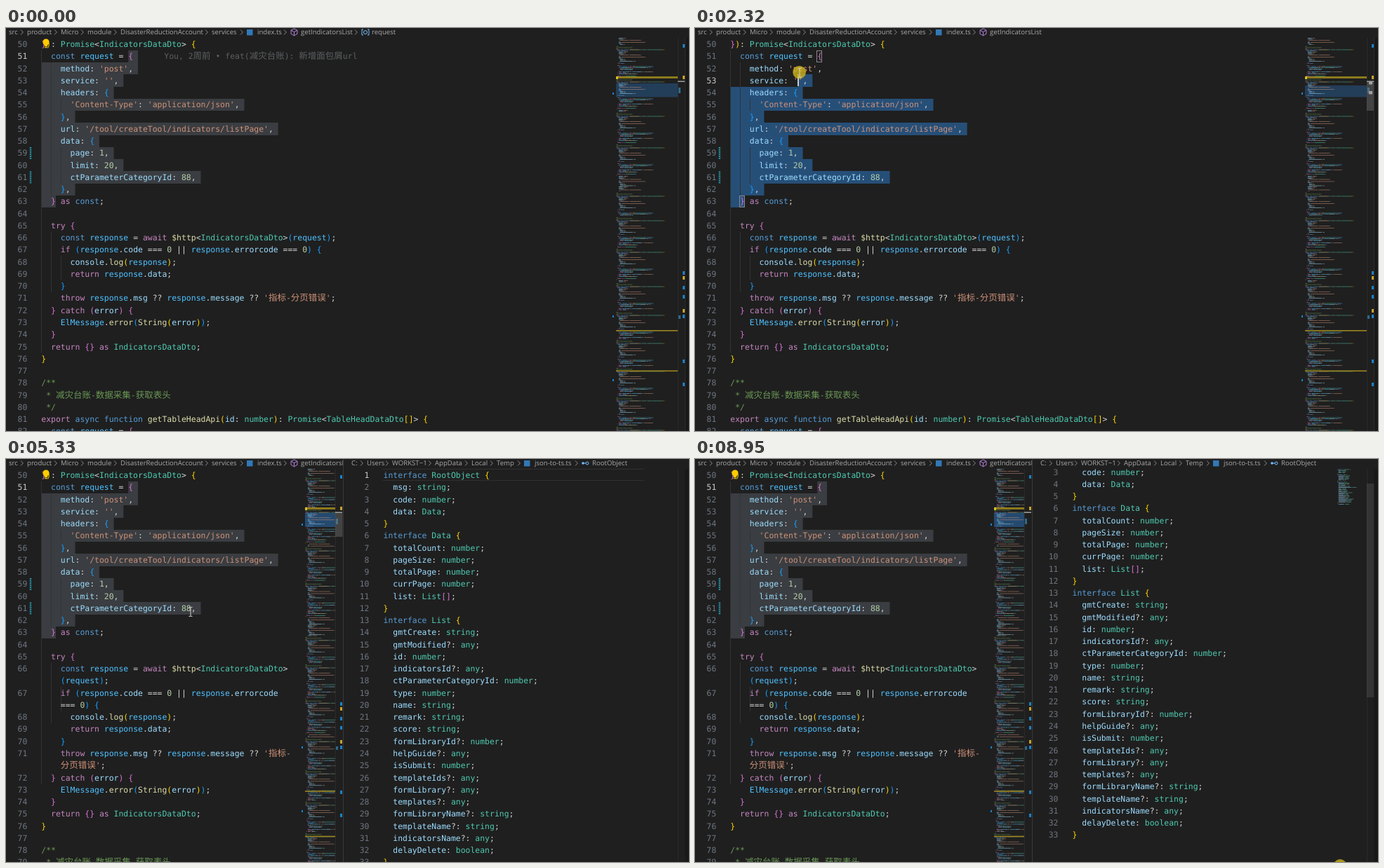
Write an HTML page that moves like this. It is 973 by 575 pixels and loops after 9.09 s.

```html
<!DOCTYPE html>
<html lang="en">
<head>
<meta charset="utf-8">
<title>Code editor</title>
<style>
  html, body { margin: 0; width: 100%; height: 100%; overflow: hidden; background: #1f1f1f; }
  #stage { display: block; width: 973px; height: 575px; }
  text { white-space: pre; text-rendering: geometricPrecision; }
  .code { font: 11.44px "DejaVu Sans Mono", monospace; }
  .cjk { font: 12.5px "Noto Sans CJK SC", "Noto Sans CJK", sans-serif; }
  .crumb { font: 9.6px "Open Sans", "Noto Sans", sans-serif; fill: #a9a9a9; }
</style>
</head>
<body>
<svg id="stage" viewBox="0 0 973 575"></svg>
<script>
const LOOP = 9090, CW = 6.886, CJK_W = 12.5, LH = 17.26, TOP = 14.6, LEFT_X = 50.3, RIGHT_X = 537.5;
const MINI = 1.5;
const stage = document.getElementById('stage');

const SOURCE = `}): Promise<IndicatorsDataDto> {
  const request = {
    method: 'post',
    service: '',
    headers: {
      'Content-Type': 'application/json',
    },
    url: '/tool/createTool/indicators/listPage',
    data: {
      page: 1,
      limit: 20,
      ctParameterCategoryId: 88,
    },
  } as const;

  try {
    const response = await $http<IndicatorsDataDto>¶(request);
    if (response.code === 0 || response.errorcode ¶=== 0) {
      console.log(response);
      return response.data;
    }
    throw response.msg ?? response.message ?? '指标-¶分页错误';
  } catch (error) {
    ElMessage.error(String(error));
  }
  return {} as IndicatorsDataDto;
}

/**
 * 减灾台账-数据采集-获取表头
 */
export async function getTableHeadApi(id: number): Promise<TableHeadDataDto[]> {
  const request = {`.split('\n');

const TYPES = `interface RootObject {
  msg: string;
  code: number;
  data: Data;
}
interface Data {
  totalCount: number;
  pageSize: number;
  totalPage: number;
  currPage: number;
  list: List[];
}
interface List {
  gmtCreate: string;
  gmtModified?: any;
  id: number;
  indicatorsId?: any;
  ctParameterCategoryId: number;
  type: number;
  name: string;
  remark: string;
  score: string;
  formLibraryId?: number;
  helpGuide?: any;
  isSubmit: number;
  templateIds?: any;
  formLibrary?: any;
  templates?: any;
  formLibraryName?: string;
  templateName?: string;
  indicatorsName?: any;
  delayDelete: boolean;
}`.split('\n');

function el(tag, attrs = {}, parent = stage, text) {
  const node = document.createElementNS('http://www.w3.org/2000/svg', tag);
  for (const k in attrs) node.setAttribute(k, attrs[k]);
  if (text !== undefined) node.textContent = text;
  parent.appendChild(node);
  return node;
}
const rect = (p, x, y, width, height, fill, more) => el('rect', { x, y, width, height, fill, ...more }, p);
const pane = (x, y, width, height, p) =>
  el('svg', { x, y, width, height, viewBox: `${x} ${y} ${width} ${height}`, overflow: 'hidden' }, p);
const show = (node, on) => node.setAttribute('visibility', on ? 'inherit' : 'hidden');
const rowTop = i => TOP + i * LH;

// ---- syntax colouring and layout ----
const BRACKETS = ['#ffd700', '#da70d6', '#179fff'];
const WORDS = [
  [/^(await|return|throw|try|catch|if|as|export)$/, '#c586c0'],
  [/^(const|async|function|interface)$/, '#569cd6'],
  [/^(\w+Dto|Promise|RootObject|Data|List|string|number|any|boolean)$/, '#4ec9b0'],
  [/^(request|response|ElMessage)$/, '#4fc1ff'],
  [/^\$http$/, '#dcdcaa']
];

function tokenize(line, state) {
  const out = [];
  const re = /(\/\*\*|^ \*.*$)|('[^']*')|([A-Za-z_$][\w$]*)|(\d+)|([{}()[\]])|(\s+)|(.)/g;
  for (const m of line.matchAll(re)) {
    const s = m[0];
    let c = '#d4d4d4';
    if (m[1]) c = '#6a9955';
    else if (m[2]) c = '#ce9178';
    else if (m[3]) {
      const hit = WORDS.find(w => w[0].test(s));
      c = hit ? hit[1] : line[m.index + s.length] === '(' ? '#dcdcaa' : '#9cdcfe';
    } else if (m[4]) c = '#b5cea8';
    else if (m[5]) {
      const open = '{(['.includes(s);
      if (!open) state.depth--;
      c = BRACKETS[state.depth % 3];
      if (open) state.depth++;
    }
    out.push({ s, c });
  }
  return out;
}

const isCjk = s => /[\u4e00-\u9fff]/.test(s);
const runs = s => s.match(/[\u4e00-\u9fff]+|[^\u4e00-\u9fff]+/g) || [];
const runWidth = s => s.length * (isCjk(s) ? CJK_W : CW);

function layout(lines, first, depth, wrap) {
  const rows = [], state = { depth };
  lines.forEach((line, i) => {
    let row = { n: first + i, runs: [] }, x = 0;
    rows.push(row);
    for (const { s, c } of tokenize(line, state)) {
      s.split('¶').forEach((part, k) => {
        if (k && wrap) {
          rows.push(row = { runs: [] });
          x = 4 * CW;
        }
        for (const r of runs(part)) {
          if (r.trim()) row.runs.push({ x, s: r, c });
          x += runWidth(r);
        }
      });
    }
  });
  return rows;
}

function drawRuns(list, x0, y, parent) {
  const t = el('text', { class: 'code', y }, parent);
  for (const r of list)
    el('tspan', { x: x0 + r.x, fill: r.c, ...(isCjk(r.s) && { class: 'cjk' }) }, t, r.s);
}

function drawRows(rows, x0, parent) {
  const nums = {};
  rows.forEach((row, i) => {
    const y = rowTop(i) + 12.4;
    if (row.n) nums[row.n] = el('text',
      { class: 'code', x: x0 - 20, y, fill: '#6e7681', 'text-anchor': 'end' }, parent, row.n);
    drawRuns(row.runs, x0, y, parent);
  });
  return nums;
}

// ---- minimap ----
function drawMini(parent, x0, rows, starts, end) {
  const paths = {};
  starts.forEach((start, i) => {
    const stop = (starts[i + 1] ?? end) - 2;
    for (let r = 0; start + r * MINI < stop; r++) {
      const row = rows[r + (starts.length > 1 && !i ? 6 : 0)] ?? rows[5 + r % 10];
      for (const k of row.runs)
        paths[k.c] = (paths[k.c] || '') +
          `M${(x0 + k.x / 8).toFixed(1)} ${start + r * MINI + .5}h${(runWidth(k.s) / 8 - .2).toFixed(1)}`;
    }
  });
  for (const c in paths)
    el('path', { d: paths[c], stroke: c, 'stroke-width': 1, opacity: .5, fill: 'none' }, parent);
}

const BLOCKS = [14, 26, 72, 121, 166, 235, 270, 315, 364, 405, 445, 485, 527, 569];
const BLUE = '#1b81c8', YELLOW = '#c9a227';

function drawLeftMini(parent, x0, edge, rows, split) {
  const map = y => split && y > 70 ? 69 + (y - 70) * 1.12 : y;
  const k = rows.findIndex(r => r.n === 78), e = rows.findIndex(r => r.n === 77);
  const block = [...rows.slice(k, k + 4), ...rows.slice(1, e)];
  const clip = pane(x0, 14, edge - x0, 561, parent);
  const sel = rect(clip, x0, 79, edge - x0, 20, '#264f78', { opacity: split ? .9 : .65 });
  drawMini(clip, x0 + .5, block, BLOCKS.map(map), 585);
  rect(clip, x0, map(69), edge - x0, 3, '#8c7a1c');
  rect(clip, x0, 69, 3, 4, '#d8c020');
  for (const y of [431, 488.5]) rect(clip, x0, map(y), edge - x0, 1.6, '#9a861f');
  for (const y of [92, 410, 501]) rect(parent, x0 - 5, y, 2, 3, BLUE);
  return sel;
}

function drawRuler(parent, x) {
  rect(parent, x, 14, 1, 561, '#2a2a2a');
  for (const y of [23, 347, 368, 381, 409, 473, 506]) rect(parent, x + 7, y, 3, 5, BLUE);
  for (const y of [68, 354, 401]) rect(parent, x + 7, y, 3, 5, YELLOW);
  rect(parent, x, 75.5, 10, 1.5, '#a0a0a0');
  rect(parent, x + 1, 85, 3, 8, '#2d6a8a');
  rect(parent, x + 1, 410, 3, 5, '#2d6a8a');
}

// ---- breadcrumbs ----
function icon(kind, x, p) {
  const line = (d, stroke) => el('path', { d, stroke, fill: 'none', 'stroke-width': 1 }, p);
  if (kind === 'file') rect(p, x, 2, 8.5, 8.5, '#3178b6');
  if (kind === 'fn') line(`M${x + 5.5} 1l4.5 2.3v5l-4.5 2.6l-4.5 -2.6v-5zM${x + 1} 3.3l4.5 2.3l4.5 -2.3M${x + 5.5} 5.6v5`, '#b180d7');
  if (kind === 'var') {
    line(`M${x + 3} 2h-2v8h2M${x + 9} 2h2v8h-2`, '#75beff');
    line(`M${x + 6} 3.5l2.4 1.2v2.8l-2.4 1.2l-2.4 -1.2v-2.8z`, '#75beff');
  }
  if (kind === 'type') {
    el('circle', { cx: x + 2, cy: 6, r: 1.8, fill: '#75beff' }, p);
    line(`M${x + 3} 6h3`, '#75beff');
    el('circle', { cx: x + 8, cy: 6, r: 2, fill: 'none', stroke: '#75beff' }, p);
  }
}
function crumbs(p, items) {
  for (const [x, text, kind] of items) {
    if (x > 4 && x !== 492) el('path',
      { d: `M${x - 9} 2.5l3.4 3.5l-3.4 3.5`, stroke: '#8c8c8c', fill: 'none' }, p);
    if (kind) icon(kind, x, p);
    el('text', { class: 'crumb', x: x + (kind ? 15 : 0), y: 9.4 }, p, text);
  }
}
const LEFT_PATH = [[4, 'src'], [30, 'product'], [78, 'Micro'], [116, 'module'],
  [163, 'DisasterReductionAccount'], [293, 'services'], [343, 'index.ts', 'file'],
  [405, 'getIndicatorsList', 'fn']];
const RIGHT_PATH = [[492, 'C:'], [514, 'Users'], [550, 'WORKST~1'], [611, 'AppData'], [663, 'Local'],
  [699, 'Temp'], [738, 'json-to-ts.ts', 'file'], [820, 'RootObject', 'type']];

// ---- left editor ----
rect(stage, 0, 0, 973, 575, '#1f1f1f');
const lineHl = el('path', { d: 'M50 239.5H862M50 255.5H862', stroke: '#303030' });
const selection = el('path');

let guides = '';
const guide = (col, from, to) => {
  guides += `M${Math.round(LEFT_X + col * CW) + .5} ${rowTop(from - 50)}V${rowTop(to - 49)}`;
};
guide(0, 51, 75); guide(2, 52, 62); guide(2, 66, 70);
guide(4, 55, 55); guide(4, 59, 61); guide(4, 68, 69);
el('path', { d: guides, stroke: '#333333', fill: 'none' });

for (const n of [59, 61]) el('path', {
  d: `M35 ${rowTop(n - 50)}v${LH}`, stroke: '#2490a8', 'stroke-width': 2.5, 'stroke-dasharray': '2 1'
});

const boxes = el('g');
for (const [col, n] of [[18, 51], [2, 63]])
  rect(boxes, Math.round(LEFT_X + col * CW) - .5, Math.round(rowTop(n - 50)) + .5, 7, 16, 'none', { stroke: '#888' });

function leftPane(width, split) {
  const root = pane(0, 0, width, 575);
  const rows = layout(SOURCE, 50, 2, split);
  const nums = drawRows(rows, LEFT_X, root);
  const edge = split ? 469 : 957;
  const sel = drawLeftMini(root, split ? 426 : 869, edge, rows, split);
  drawRuler(root, edge);
  const slider = rect(root, edge, 77, 10.5, split ? 34 : 41, '#797979');
  crumbs(root, LEFT_PATH);
  return { root, nums, sel, slider };
}
const full = leftPane(973, false);
const half = leftPane(480, true);
rect(full.root, 967, 14, 6, 561, '#191919');
rect(full.root, 967, 14, 1, 561, '#2b2b2b');
const marks = el('g', {}, full.root);
for (const y of [76, 90]) rect(marks, 960, y, 5, 4.5, '#a0a0a0');
const crumbTail = el('g', {}, full.root);
crumbs(crumbTail, [[506, 'request', 'var']]);

const blame = el('g');
let bx = 0;
drawRuns(runs('You, 2周前 • feat(减灾台账): 新增面包屑url').map(s => {
  const r = { x: bx, s, c: '#5c5f62' };
  bx += runWidth(s);
  return r;
}), 225.3, rowTop(1) + 12.4, blame);

const bulb = el('g');
el('circle', { cx: 57, cy: 20, r: 4.6, fill: '#ffcc00' }, bulb);
rect(bulb, 54.8, 23, 4.4, 3.4, '#ffcc00');
rect(bulb, 55, 27, 4, 1.4, '#d8ad00');

// ---- right editor ----
const right = el('g');
rect(right, 480, 0, 493, 575, '#1f1f1f');
rect(right, 480, 0, 1, 575, '#3a3a3a');
const view = pane(481, 14, 492, 561, right);
const scroller = el('g', {}, view);
el('path', { d: 'M537 14.5H909M537 30.5H909', stroke: '#303030' }, scroller);
const typeRows = layout(TYPES, 1, 0, false);
drawRows(typeRows, RIGHT_X, scroller)[1].setAttribute('fill', '#cccccc');
const rightCaret = rect(scroller, 537, 14, 1.8, 17, '#d0d0d0');
const rightMini = el('g', {}, right);
drawMini(rightMini, 915, typeRows, [14.5], 67);
const miniSlider = rect(right, 914, 18, 43, 49, '#797979', { opacity: .2 });
rect(right, 957, 14, 1, 561, '#2a2a2a');
const rightSlider = rect(right, 957, 14, 10.5, 305, '#797979');
rect(right, 967.5, 14, 5.5, 561, '#191919');
crumbs(right, RIGHT_PATH);

// ---- caret and pointer ----
const caret = rect(stage, 0, 0, 1.8, 17, '#d8d8d8');
const pointer = el('g');
const halo = el('circle', { cx: -.5, cy: -.7, r: 9.3, fill: '#c9b118', opacity: .82 }, pointer);
const beam = el('path', { d: 'M-2.5 -6.5H-.7L0 -6L.7 -6.5H2.5M0 -6V6M-2.5 6.5H-.7L0 6L.7 6.5H2.5', stroke: '#d4d4d4', fill: 'none' }, pointer);
const arrow = el('path', { d: 'M0 0V12L3 9.4L5 14L7 13L5 8.6H9Z', fill: '#fff', stroke: '#222', 'stroke-width': .6 }, pointer);

// time, x, y
const PATH = [[260, 300, 590], [1150, 91, 473], [1830, 67, 236], [2110, 67, 236], [2320, 149, 64],
  [2500, 176, 42], [3020, 178, 42], [3570, 239, 136], [4250, 239, 136], [4930, 263, 218],
  [6080, 263, 218], [6260, 660, 345], [7290, 660, 345], [7690, 974, 480], [7910, 969, 542],
  [8470, 917, 590], [8870, 919.5, 581], [LOOP, 919.5, 581]];

function mouseAt(t) {
  const i = PATH.findIndex(p => p[0] > t);
  if (i < 1) return PATH[i < 0 ? PATH.length - 1 : 0].slice(1);
  const [t0, x0, y0] = PATH[i - 1], [t1, x1, y1] = PATH[i];
  const k = (t - t0) / (t1 - t0);
  return [x0 + (x1 - x0) * k, y0 + (y1 - y0) * k];
}
const ramp = (t, from, to) => Math.min(1, Math.max(0, (t - from) / (to - from)));
const between = (t, a, b) => t >= a && t < b;

// Caret position while the button is held trails the pointer slightly.
function caretAt(t) {
  if (!between(t, 1900, 2535)) return [51, 18];
  if (t < 2145) return [63, 3];
  const [x, y] = mouseAt(t - 12);
  const n = Math.min(63, Math.max(51, 50 + Math.floor((y - TOP) / LH)));
  const len = SOURCE[n - 50].length;
  return [n, Math.min(n === 63 ? 3 : len, Math.max(0, Math.round((x - LEFT_X) / CW)))];
}

function selectionPath(n0, c0) {
  let d = '';
  for (let n = n0; n <= 63; n++) {
    const from = LEFT_X + (n === n0 ? c0 * CW : 0);
    const to = LEFT_X + (n === 63 ? 3 : SOURCE[n - 50].length + 1) * CW;
    const y = Math.round(rowTop(n - 50)), b = Math.round(rowTop(n - 49));
    if (to > from) d += `M${from} ${y}H${to}V${b}H${from}Z`;
  }
  return d;
}

function render(t) {
  const split = t >= 5330, clicked = between(t, 1900, 2145);
  const [n, col] = caretAt(t);

  show(full.root, !split);
  show(half.root, split);
  show(right, split);
  show(rightMini, t >= 5400);

  selection.setAttribute('d', clicked ? '' : selectionPath(n, col));
  selection.setAttribute('fill', between(t, 1900, 5330) ? '#264f78' : '#3a3d41');
  show(lineHl, clicked);
  show(boxes, between(t, 1900, 2600));
  show(marks, !split && between(t, 1900, 2600));
  show(crumbTail, !split && !between(t, 1900, 2740));
  show(blame, !split && !between(t, 1900, 2800));
  show(bulb, !between(t, 1900, 3090));

  for (const p of [full, half])
    for (const k in p.nums) p.nums[k].setAttribute('fill', +k === n ? '#cccccc' : '#6e7681');
  const selY = 79 + (n - 51) * MINI;
  full.sel.setAttribute('y', clicked ? 97 : selY);
  full.sel.setAttribute('height', clicked ? 1 : 98.5 - selY);
  half.sel.setAttribute('y', 77);
  full.slider.setAttribute('opacity', .4 * ramp(t, 300, 500));
  half.slider.setAttribute('opacity', .4 * (1 - ramp(t, 6260, 6740)));

  caret.setAttribute('x', LEFT_X + col * CW - .6);
  caret.setAttribute('y', Math.round(rowTop(n - 50)));
  show(caret, between(t, 1900, 3390) || between(t, 3920, 4460) || between(t, 4930, 5330));

  const k = ramp(t, 6290, 6640), scroll = 39 * k * (2 - k);
  scroller.setAttribute('transform', `translate(0 ${-scroll})`);
  show(rightCaret, between(t, 5400, 5860) || between(t, 6390, 6920));
  rightSlider.setAttribute('y', 14 + scroll * 21 / 39);
  rightSlider.setAttribute('opacity', .3 * ramp(t, 6080, 6200) - .06 * ramp(t, 8880, 8950));

  const [x, y] = mouseAt(t), pressed = between(t, 1900, 2600) || t >= 8880;
  const onEdge = x > 908;
  pointer.setAttribute('transform', `translate(${x} ${y})`);
  show(pointer, t >= 260);
  show(halo, t >= 260 && pressed);
  show(beam, t >= 260 && !onEdge);
  show(arrow, t >= 260 && onEdge);
  show(miniSlider, split && between(x, 913, 957) && y < 575);
}

function tick() {
  render(performance.now() % LOOP);
  requestAnimationFrame(tick);
}
tick();
</script>
</body>
</html>
```
